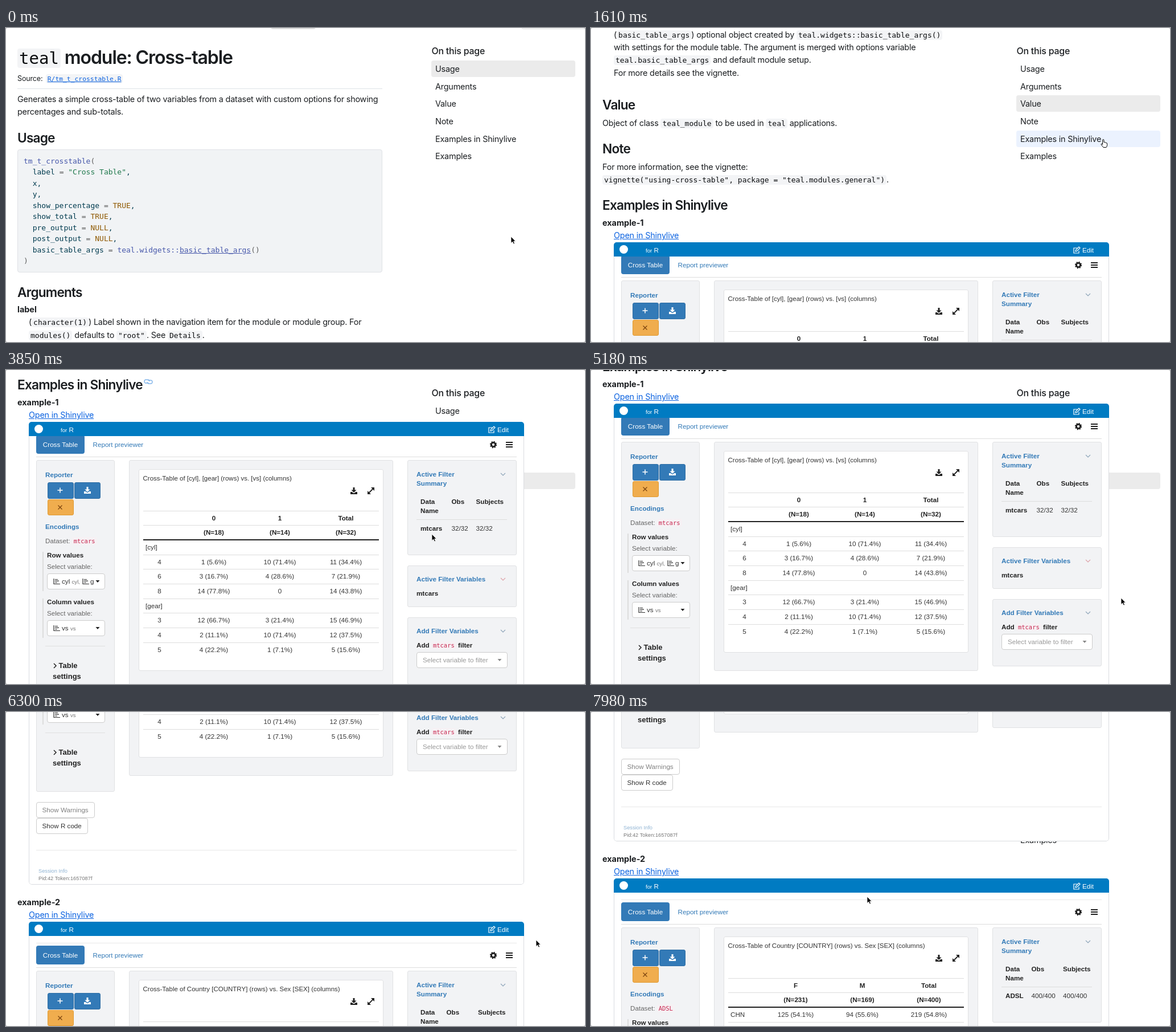
An HTML page for the animation above (8 s loop, 1017 by 551 pixels).

```html
<!DOCTYPE html>
<html lang="en">
<head>
<meta charset="utf-8">
<title>Cross-table module</title>
<style>
html, body { margin: 0; width: 100%; height: 100%; overflow: hidden; background: #ccc; }
#stage { position: absolute; width: 1017px; height: 551px; overflow: hidden; background: #fff; border-radius: 3px;
  font: 14.4px Inter, sans-serif; font-optical-sizing: none; letter-spacing: -.014em; color: #1b1e21; white-space: nowrap; }
#stage div, p, svg, dl, pre { position: absolute; margin: 0; }
div { box-sizing: border-box; }
p { line-height: 20px; margin-top: -10px !important; }
svg { overflow: visible; }
.h1 { font-size: 32.1px; font-weight: 560; letter-spacing: -.035em; }
.h2 { font-size: 22.7px; font-weight: 560; letter-spacing: -.036em; }
.bold, dt { font-weight: 700; letter-spacing: 0; }
code, pre { font: 13px/0 "DejaVu Sans Mono", monospace; letter-spacing: 0; }
code { color: #0c0e10; background: #f3f4f6; border-radius: 4px; padding: 1px 3px; }
.h1 code { font-size: 29px; padding: 0 3px; }
.source { font-size: 12.6px; }
.source code { font-size: 11.35px; margin-left: 2px; }
.link, code.link { color: #0b62e0; text-decoration: underline; }
.link.over { color: #0a4cae; }
pre { left: 20px; top: 213px; width: 641px; height: 216px; box-sizing: border-box; padding: 9.5px 10px;
  background: #f1f3f5; border: 1px solid #dfe2e6; border-radius: 4px; line-height: 19.5px; color: #003b4f; }
.fn { color: #4758ab; } .str { color: #20794d; } .lit { color: #8f5902; } .op { color: #5e5e5e; }
dl { left: 20px; top: 483px; line-height: 22.4px; }
dd { margin: 0 0 13.6px 20px; }
.toc { left: 747px; width: 253px; height: 29px; border-radius: 4px; padding-left: 7px; line-height: 29px; }
.app { left: 40px; width: 870px; height: 660px; overflow: hidden; background: #fff; border-radius: 5px;
  font: 11.67px "Liberation Sans", Arial, sans-serif; letter-spacing: 0; color: #333; }
.app::after { content: ""; position: absolute; inset: 0; border: 1px solid #d9dce0; border-radius: 5px; }
.bar { width: 870px; height: 25px; background: #007bc2; color: #fff; z-index: 1; }
.app .bold { color: #222; }
.app .blue { color: #337ab7; }
.app code { font-size: 10.5px; color: #c7254e; background: #f6f1f4; padding: 1px 3px; }
.mid { width: 160px; margin-left: -80px !important; text-align: center; }
.panel { background: #f2f3f5; border: 1px solid #e0e1e3; border-radius: 3px; }
.field { background: #fff; border: 1px solid #ccc; border-radius: 4px; }
.grey { color: #666; }
small { font-size: 9.7px; color: #777; }
</style>
</head>
<body>
<div id="stage"></div>
<script>
const EXAMPLES = 1490;   // scroll offset of the examples section
const APP_STEP = 725;

const text = (x, y, html, cls = '', css = '') =>
  `<p class="${cls}" style="left:${x}px;top:${y}px;${css}">${html}</p>`;
const box = (x, y, w, h, cls = '', css = '') =>
  `<div class="${cls}" style="left:${x}px;top:${y}px;width:${w}px;height:${h}px;${css}"></div>`;
const rule = (x, y, w, color = '#ddd', h = 1) => box(x, y, w, h, '', `background:${color}`);
const icon = (x, y, d, color = '#222', stroke = 0) =>
  `<svg width="1" height="1" style="left:${x}px;top:${y}px"><path d="${d}" ` +
  (stroke ? `fill="none" stroke="${color}" stroke-width="${stroke}"` : `fill="${color}"`) + '/></svg>';
const md = s => s.replace(/`(.+?)`/g, '<code>$1</code>');

const DOWNLOAD = 'M-1.5-6h3v4.5h3L0 3-4.5-1.5h3zM-6 2h3l2 2h2l2-2h3v4H-6z';
const CARET = 'M-3.5-2h7L0 2z';
const CHEVRON = 'M-4-2L0 2 4-2';
const CHART = 'M-5-5V4.5H6M-3-3.5H2M-3-.8H4M-3 2H1';

// ---------- documentation ----------
const usage = `tm_t_crosstable(
  label = "Cross Table",
  x,
  y,
  show_percentage = TRUE,
  show_total = TRUE,
  pre_output = NULL,
  post_output = NULL,
  basic_table_args = teal.widgets::basic_table_args()
)`.replace(/"[^"]*"|TRUE|NULL|[=()]|tm_t_crosstable|teal\.widgets::|basic_table_args(?=\()/g, m => {
  const cls = m[0] === '"' ? 'str' : /^(TRUE|NULL)$/.test(m) ? 'lit' : /^[=()]$/.test(m) ? 'op' : 'fn';
  return `<span class="${cls}"${m === 'basic_table_args' ? ' style="text-decoration:underline"' : ''}>${m}</span>`;
});

const args = {
  label: '(`character(1)`) Label shown in the navigation item for the module or module group. For<br>`modules()` defaults to `"root"`. See `Details`.',
  x: '(`data_extract_spec` or `list` of multiple `data_extract_spec`) Object with all available<br>choices with pre-selected option for variable X - row values. In case of `data_extract_spec`<br>use `select_spec(..., ordered = TRUE)` if table elements should be rendered according to<br>selection order.',
  y: '(`data_extract_spec` or `list` of multiple `data_extract_spec`) Object with all available<br>choices with pre-selected option for variable Y - column values. `data_extract_spec`<br>must not allow multiple selection in this case.',
  show_percentage: '(`logical(1)`) Indicates whether to show percentages (relevant only when `x` is a<br>`factor`). Defaults to `TRUE`.',
  show_total: '(`logical(1)`) Indicates whether to show total column. Defaults to `TRUE`.',
  pre_output: "(`shiny.tag`) optional, text or UI element to be displayed before the module's<br>output, providing context or a title.<br>with text placed before the output to put the output into context. For example a<br>title.",
  post_output: "(`shiny.tag`) optional, text or UI element to be displayed after the module's output,<br>adding context or further instructions.<br>with text placed after the output to put the output into context. Elements like<br>`shiny::helpText()` are useful.",
  basic_table_args: '(`basic_table_args`) optional object created by `teal.widgets::basic_table_args()`<br>with settings for the module table. The argument is merged with options variable<br>`teal.basic_table_args` and default module setup.<br>For more details see the vignette.'
};

const docs =
  box(465, -20, 79, 22, '', 'background:#dedede;border-radius:4px') +
  box(905, -20, 120, 22, '', 'border:1px solid #ddd;border-radius:4px') +
  text(20, 52, md('`teal` module: Cross-table'), 'h1') +
  text(20, 89, 'Source: <code class="link">R/tm_t_crosstable.R</code>', 'source') +
  rule(20, 106, 641, '#dee2e6') +
  text(20, 125, 'Generates a simple cross-table of two variables from a dataset with custom options for showing') +
  text(20, 147, 'percentages and sub-totals.') +
  text(20, 193, 'Usage', 'h2') + `<pre>${usage}</pre>` +
  text(20, 464, 'Arguments', 'h2') +
  '<dl>' + Object.entries(args).map(([k, v]) => `<dt>${k}</dt><dd>${md(v)}</dd>`).join('') + '</dl>' +
  text(20, 1340, 'Value', 'h2') +
  text(20, 1372, md('Object of class `teal_module` to be used in `teal` applications.')) +
  text(20, 1417, 'Note', 'h2') +
  text(20, 1449, 'For more information, see the vignette:') +
  text(20, 1471, md('`vignette("using-cross-table", package = "teal.modules.general")`.')) +
  text(20, EXAMPLES + 26, 'Examples in Shinylive', 'h2') +
  `<div id="anchor" style="left:250px;top:${EXAMPLES + 20}px">` +
  icon(0, 0, 'M1 3H-4A3 3 0 0 1-4-3H-1A3 3 0 0 1 2 0M-1-2H4A3 3 0 0 1 4 4H1A3 3 0 0 1-2 1', '#86b7ea', 1.4) + '</div>';

// ---------- embedded app ----------
function table(d) {
  const row = i => 174.7 + i * 25.67;
  let out = rule(241, row(0), 414) + rule(241, row(1), 414) + rule(241, row(2) - .7, 414, '#222', 1.5);
  d.rows.forEach((line, i) => {
    const [label, ...cells] = line.split('|'), y = row(i) + 12.9, head = i < 2 ? 'bold ' : '';
    out += /^\d/.test(label) ? text(269.5, y, label, 'mid') : text(245, y, label);
    cells.forEach((c, k) => out += text(d.cols[k], y, c, head + 'mid'));
    if (i > 1 && i < d.rows.length - 1) out += rule(241, row(i + 1), 414);
  });
  return out;
}

const select = (y, label, value) =>
  box(64, y - 6, 2, 69, '', 'background:#ddd') + text(72, y, label, 'bold') +
  text(72, y + 20.5, 'Select variable:', 'grey') + box(72, y + 32.5, 102, 28, 'field') +
  icon(88.5, y + 46.5, CHART, '#333', 1.2) + value(y + 46.5) + icon(160.5, y + 46.5, CARET);

function app(top, shift, d) {
  const button = (x, y, color, edge) => box(x, y, 45.5, 28.5, '', `background:${color};border:1px solid ${edge};border-radius:3px`);
  const title = (y, s, color = '#8ca3b8') => text(721, y, s, 'bold blue') + icon(872.5, y, CHEVRON, color, 1.1);
  const sheet =
    rule(53, 37, 844, '#e8e8e8') +
    box(53, 42, 85, 33, '', 'background:#337ab7;border-radius:4px') +
    text(95.5, 59, 'Cross Table', 'mid', 'color:#fff') + text(152.5, 59, 'Report previewer', 'blue') +
    icon(856, 59, 'M-3.6 0A3.6 3.6 0 1 0 3.6 0A3.6 3.6 0 1 0-3.6 0', '#222', 2.9) +
    `<svg width="1" height="1" style="left:856px;top:59px"><circle r="5.2" fill="none" stroke="#222" stroke-width="2" stroke-dasharray="2.04"/></svg>` +
    icon(884, 59, 'M-6-4H6M-6 0H6M-6 4H6', '#222', 1.9) +
    rule(53, 80, 844) +
    // left column
    box(53, 86, 137.5, 430, 'panel') + text(69, 112, 'Reporter', 'bold blue') +
    button(73, 125, '#337ab7', '#2e6da4') + icon(95, 139, 'M-4.5 0H4.5M0-4.5V4.5', '#fff', 1.5) +
    button(120, 125, '#337ab7', '#2e6da4') + icon(142.5, 139, DOWNLOAD, '#fff') +
    button(73, 154.5, '#f0ad4e', '#e09a32') + icon(95, 168.5, 'M-3.5-3.5L3.5 3.5M-3.5 3.5L3.5-3.5', '#7a420e', 1.2) +
    text(69, 202.5, 'Encodings', 'bold blue') +
    text(69, 228, `Dataset: <code>${d.data}</code>`, 'grey') +
    select(252.5, 'Row values', y => text(98, y, 'cyl <small>cyl,</small>') +
      icon(139.5, y, CHART, '#333', 1.2) + text(148, y, 'g', '', 'width:6px;overflow:hidden')) +
    select(334.5, 'Column values', y => text(98, y, 'vs <small>vs</small>')) +
    rule(69, 412, 105, '#e0e0e0') +
    icon(86, 447, 'M-2-4L2 0-2 4', '#222', 1.5) +
    text(92.5, 447, 'Table', 'bold', 'font-size:13px') + text(82, 466, 'settings', 'bold', 'font-size:13px') +
    box(53, 534, 102.5, 28, 'field') + text(63.5, 548, 'Show Warnings', '', 'color:#808080') +
    box(53, 562, 91, 28, 'field') + text(63.5, 576, 'Show R code') +
    rule(53, 618, 844, '#e8e8e8') +
    text(57, 655, 'Session Info', '', 'font-size:9.25px;color:#8fb3d3') +
    text(57, 668, 'Pid:42 Token:1657087f', '', 'font-size:9.25px;color:#777') +
    // result
    box(216, 86, 463.5, 402, 'panel') + box(232.5, 102, 430.5, 353.5, 'panel', 'background:#fff') +
    text(240.5, 118, d.title, '', 'font-size:11.5px') +
    icon(611, 140, DOWNLOAD) + icon(641, 140, 'M-6 0V6H0zM0-6H6V0z') + icon(641, 140, 'M-4 4L4-4', '#222', 1.8) +
    table(d) +
    // filters
    box(704.5, 86, 192.5, 167, 'panel') + title(110.5, 'Active Filter') + text(721, 127, 'Summary', 'bold blue') +
    text(728, 158.5, 'Data', 'bold') + text(728, 174.5, 'Name', 'bold') +
    text(d.obs[0], 158.5, 'Obs', 'bold') + text(d.obs[1], 158.5, 'Subjects', 'bold') +
    rule(721, 190, 159) + text(728, 205.5, d.data, 'bold') +
    d.obs.map(x => text(x, 205.5, d.n)).join('') +
    box(704.5, 270.5, 192.5, 73.5, 'panel') + title(294.5, 'Active Filter Variables', '#dda0a6') + text(721, 319.5, d.data, 'bold') +
    box(704.5, 361.5, 192.5, 118, 'panel') + title(385.5, 'Add Filter Variables') +
    text(721, 410.5, `Add <code>${d.data}</code> filter`, 'bold') +
    box(721, 423, 159.5, 28, 'field') + text(732, 437, 'Select variable to filter', '', 'color:#999') +
    icon(866.5, 437, CARET, '#888');

  const bar =
    box(10, 5, 15, 15, '', 'background:#fff;border-radius:50%') +
    text(56, 14, '<span style="font-size:9.7px">for</span> R') +
    icon(813, 13.5, 'M1-4H-5V5H4V1M-2 2L-1.5-.5 4-6 6-4 .5 1.5z', '#fff', 1.2) + text(823, 13.5, 'Edit');

  return text(20, top - 34, d.name, 'bold') +
    text(40, top - 12, 'Open in Shinylive', 'link open') +
    `<div class="app" style="top:${top}px"><div style="left:-40px;top:${-shift}px">${sheet}</div><div class="bar">${bar}</div></div>`;
}

const apps = app(EXAMPLES + 91, 19, {
  name: 'example-1', title: 'Cross-Table of [cyl], [gear] (rows) vs. [vs] (columns)',
  data: 'mtcars', n: '32/32', obs: [782.5, 825.5], cols: [365, 481, 597],
  rows: ['|0|1|Total', '|(N=18)|(N=14)|(N=32)',
    '[cyl]', '4|1 (5.6%)|10 (71.4%)|11 (34.4%)', '6|3 (16.7%)|4 (28.6%)|7 (21.9%)', '8|14 (77.8%)|0|14 (43.8%)',
    '[gear]', '3|12 (66.7%)|3 (21.4%)|15 (46.9%)', '4|2 (11.1%)|10 (71.4%)|12 (37.5%)', '5|4 (22.2%)|1 (7.1%)|5 (15.6%)']
}) + app(EXAMPLES + 91 + APP_STEP, 0, {
  name: 'example-2', title: 'Cross-Table of Country [COUNTRY] (rows) vs. Sex [SEX] (columns)',
  data: 'ADSL', n: '400/400', obs: [773.5, 829], cols: [359.5, 476.5, 593.5],
  rows: ['|F|M|Total', '|(N=231)|(N=169)|(N=400)', 'CHN|125 (54.1%)|94 (55.6%)|219 (54.8%)', 'USA|']
});

// ---------- stage ----------
const tocNames = ['Usage', 'Arguments', 'Value', 'Note', 'Examples in Shinylive', 'Examples'];
const tocY = i => 71.5 + i * 30.65;
const stage = document.getElementById('stage');
stage.innerHTML =
  text(747.5, 40.5, 'On this page', '', 'font-size:15.9px;font-weight:500') +
  tocNames.map((s, i) => `<div class="toc" style="top:${tocY(i) - 14.5}px">${s}</div>`).join('') +
  `<div id="page">${docs}${apps}</div>` +
  '<svg id="cursor" width="1" height="1"><path id="arrow" d="M0 0V11.5L2.7 9 4.5 13 6.5 12.2 4.7 8.2H8z" fill="#000" stroke="#fff" stroke-width=".8"/>' +
  '<path id="hand" transform="translate(-3-.5)" d="M2.6 9V1.4Q2.6 0 3.7 0T4.9 1.4V5Q6 4.3 6.8 5.4 8 4.8 8.7 6 10.6 5.8 10.6 7.8V10Q10.6 12 9 14H4Q2.5 12 .2 9.3-.3 8 1 7.6 2 7.6 2.6 9z" fill="#fff" stroke="#000"/></svg>';

const $ = id => document.getElementById(id);
const page = $('page'), cursor = $('cursor'), arrow = $('arrow'), hand = $('hand'), anchor = $('anchor');
const toc = [...document.querySelectorAll('.toc')], links = [...document.querySelectorAll('.open')];

// [ms, value, ...]
const scrollKeys = [[1120, 0], [1260, 109], [1470, 740], [1700, 1390], [1890, EXAMPLES], [5040, EXAMPLES],
  ...[[5110, 10], [5180, 32], [5460, 190], [5740, 334], [5880, 390], [6160, 446], [6230, 446], [6300, 448], [6500, 492], [6860, 524]]
    .map(([t, s]) => [t, EXAMPLES + s])];
const cursorKeys = [[0, 887, 366], [840, 899, 196], [1750, 899, 196], [2170, 816, 161], [2590, 742, 171], [3010, 100, 79],
  [3290, 100, 79], [3780, 757, 250], [4130, 590, 457], [4200, 460, 471], [4340, 266, 340], [4480, 390, 186],
  [4830, 931, 400], [6300, 931, 400], [7070, 271, 284], [7490, 100, 279], [7630, 100, 279], [7980, 485, 324]];

// monotone cubic through the keys; comes to rest at holds and turning points
function track(keys, t, c) {
  const last = keys.length - 1;
  if (t <= keys[0][0]) return keys[0][c];
  if (t >= keys[last][0]) return keys[last][c];
  const i = keys.findIndex(k => k[0] > t) - 1;
  const slope = j => j < 0 || j >= last ? 0 : (keys[j + 1][c] - keys[j][c]) / (keys[j + 1][0] - keys[j][0]);
  const tangent = j => {
    const a = slope(j - 1), b = slope(j);
    return a * b > 0 ? 2 * a * b / (a + b) : 0;
  };
  const h = keys[i + 1][0] - keys[i][0], u = (t - keys[i][0]) / h, v = 1 - u;
  return keys[i][c] * v * v * (1 + 2 * u) + keys[i + 1][c] * u * u * (3 - 2 * u) +
    h * u * v * (tangent(i) * v - tangent(i + 1) * u);
}

function draw() {
  const t = performance.now() % 8000;
  const scroll = track(scrollKeys, t, 1), x = track(cursorKeys, t, 1), y = track(cursorKeys, t, 2);
  page.style.transform = `translateY(${-Math.round(scroll)}px)`;
  anchor.style.display = t > 1820 ? '' : 'none';

  const active = scroll > EXAMPLES + 45 ? -1 : [70, 700, 1330, 1400, Infinity].findIndex(limit => scroll < limit);
  const uncovered = EXAMPLES + 91 - scroll > y;
  let pointing = false;
  toc.forEach((el, i) => {
    const over = uncovered && x > 747 && x < 1000 && Math.abs(y - tocY(i)) < 14.5;
    pointing ||= over;
    el.style.background = i === active ? '#ebebeb' : over ? '#ebf2fe' : '';
  });
  links.forEach((el, i) => {
    const over = x > 40 && x < 154 && Math.abs(y - (EXAMPLES + 79 + i * APP_STEP - scroll)) < 10;
    pointing ||= over;
    el.classList.toggle('over', over);
  });

  cursor.style.left = x + 'px';
  cursor.style.top = y + 'px';
  arrow.style.display = pointing ? 'none' : '';
  hand.style.display = pointing ? '' : 'none';
  requestAnimationFrame(draw);
}
draw();
</script>
</body>
</html>
```
